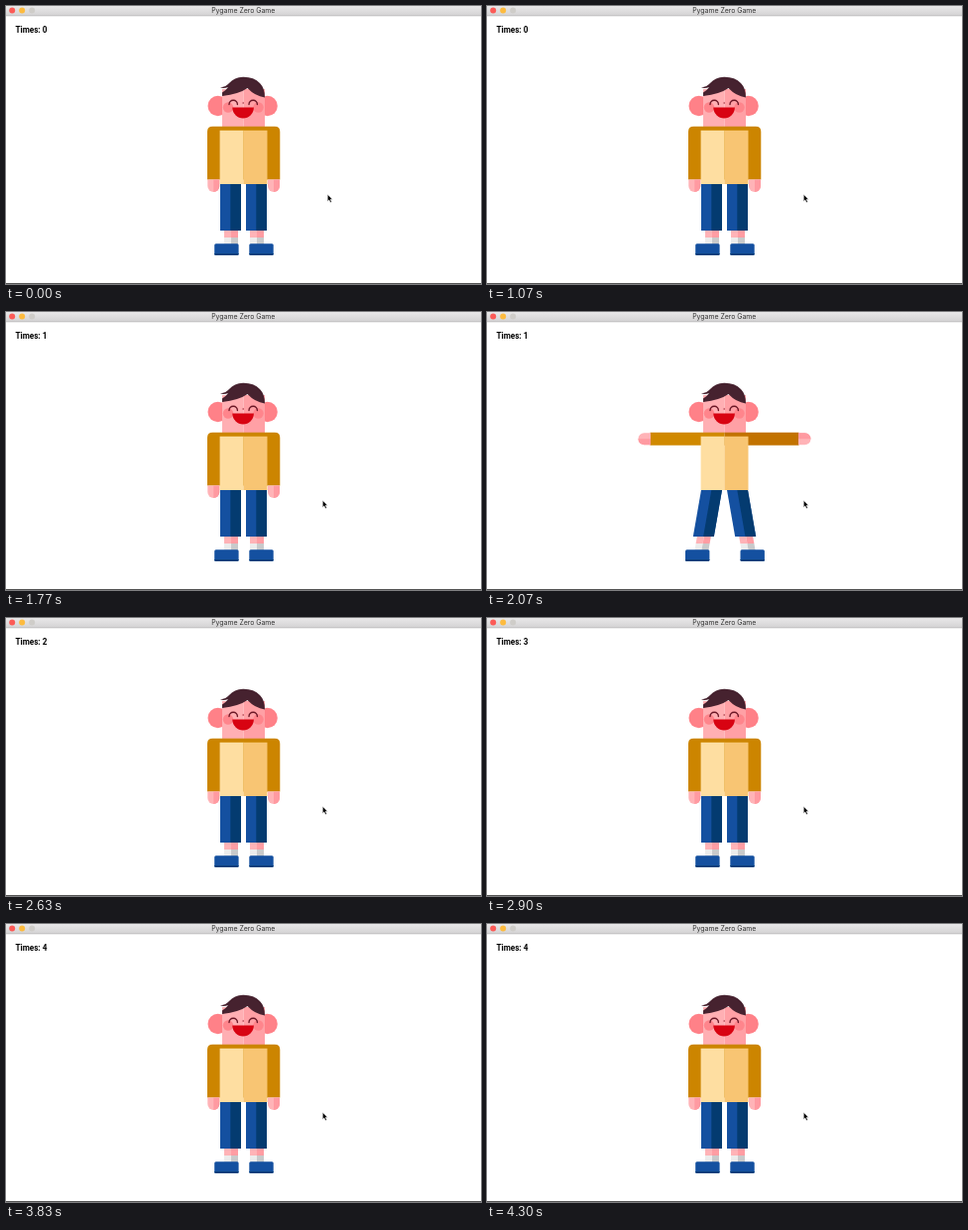
An HTML page that plays this animation: 479 px wide and 281 px high, repeating every 4360 ms.

```html
<!DOCTYPE html>
<html lang="en">
<head>
<meta charset="utf-8">
<title>Pygame Zero Game</title>
<style>
  html, body { margin: 0; width: 100%; height: 100%; overflow: hidden; background: #fff; }
  svg { display: block; width: 479px; height: 281px; }
  .title { font: 6.9px Inter, Roboto, sans-serif; fill: #333; text-anchor: middle; }
  .score { font: bold 8.2px Roboto, Arial, sans-serif; }
</style>
</head>
<body>
<svg viewBox="0 0 479 281">
  <defs>
    <linearGradient id="bar" x2="0" y2="1">
      <stop stop-color="#e9e8e9"/>
      <stop offset="1" stop-color="#d3d2d3"/>
    </linearGradient>
    <g id="trouser">
      <path fill="#1450a0" d="M0 180h21v47H0z"/>
      <path fill="#043b70" d="M10.3 180H21v47H10.3z"/>
      <path fill="#ffb3b7" d="M4 227h7v7H4z"/>
      <path fill="#ff9da3" d="M11 227h7v7h-7z"/>
      <path fill="#ececec" d="M4 234h7v7H4z"/>
      <path fill="#c9cacb" d="M11 234h7v7h-7z"/>
    </g>
    <g id="shoe">
      <rect y="240.3" width="24.4" height="11.7" rx="1.5" fill="#1450a0"/>
      <path fill="#073f7c" d="M0 250h24.4v.7q0 1.3-1.5 1.3H1.5Q0 252 0 250.7z"/>
    </g>
    <g id="hand">
      <path fill="#ffb3b7" d="M0 0h12v6.5a6 6 0 0 1-12 0z"/>
      <path fill="#ff9aa1" d="M6 0h6v6.5a6 6 0 0 1-6 6z"/>
    </g>
  </defs>

  <path fill="#fff" d="M0 0h479v281H0z"/>
  <path fill="url(#bar)" d="M0 0h479v10H0z"/>
  <path fill="#b9b8b9" d="M0 9.6h479v.6H0z"/>
  <path fill="#555" d="M0 280h479v1H0z"/>
  <circle cx="6.2" cy="4.6" r="3" fill="#fc5b57"/>
  <circle cx="16.2" cy="4.6" r="3" fill="#fdbb3f"/>
  <circle cx="26.2" cy="4.6" r="3" fill="#cfcdc9"/>
  <text class="title" x="239.3" y="7.2">Pygame Zero Game</text>
  <text class="score" id="score" x="9.4" y="26.6"></text>

  <g id="leftLeg"><use href="#trouser" x="216"/></g>
  <g id="rightLeg"><use href="#trouser" x="242"/></g>
  <use id="leftShoe" href="#shoe" x="210.2"/>
  <use id="rightShoe" href="#shoe" x="245.3"/>

  <g id="head">
    <circle cx="213.7" cy="101" r="10.2" fill="#ff8188"/>
    <circle cx="263.6" cy="101" r="10.2" fill="#ff8188"/>
    <path fill="#ffafb3" d="M218 84h21.5v39H218z"/>
    <path fill="#ffa0a5" d="M239.5 84H261v39h-21.5z"/>
    <circle cx="224" cy="102.5" r="5.2" fill="#ff858c"/>
    <circle cx="254.5" cy="102.5" r="5.2" fill="#ff858c"/>
    <path fill="#46222f" d="M216 82.5Q222 81.5 225 78Q230 72 239 71.7Q250 71.5 256 78Q261 83 261 92.5Q251 91 243.5 83Q235 89 218 91V87.5Q222 85 224 82Q220 83.5 216 82.5z"/>
    <g fill="none" stroke="#6b1726" stroke-width="1.4" stroke-linecap="round">
      <path d="M225 99.5a4.2 4.2 0 0 1 8.4 0M245 99.5a4.2 4.2 0 0 1 8.4 0"/>
    </g>
    <circle cx="239.2" cy="98" r=".8" fill="#a5313f"/>
    <path fill="#d80312" d="M228.3 102.5h21.6a10.8 11 0 0 1-21.6 0z"/>
  </g>

  <g id="armsDown">
    <path fill="#cc8500" d="M203 175.5V127q0-5.3 5.3-5.3H271q5.3 0 5.3 5.3v48.5z"/>
    <use href="#hand" x="203.3" y="175.5"/>
    <use href="#hand" x="264" y="175.5"/>
  </g>
  <g id="armsOut">
    <path fill="#d08900" d="M164.5 121.7h75v13h-75z"/>
    <path fill="#c27200" d="M239.5 121.7h75v13h-75z"/>
    <use href="#hand" transform="translate(165 122.2) rotate(90)"/>
    <use href="#hand" transform="translate(314 134.2) rotate(-90)"/>
  </g>
  <path fill="#fedea1" d="M215.6 125.7h24V180h-24z"/>
  <path fill="#f8c573" d="M239.5 125.7h24V180h-24z"/>

  <path id="cursor" fill="#000" stroke="#fff" stroke-width=".5"
        d="M0 0v7l1.6-1.5 1.2 2.7 1.3-.6-1.2-2.6h2.1z"/>
</svg>
<script>
  const LOOP = 4360;
  const SPREADS = [[2000, 2100], [2870, 2900], [3770, 3830]];
  const COUNT_TIMES = [1130, 2100, 2900, 3830];
  const SLANT = 0.174, SHOE_SHIFT = 10.2, HIP = 180;

  const el = id => document.getElementById(id);
  const show = (id, on) => el(id).setAttribute("display", on ? "inline" : "none");
  const place = (id, value) => el(id).setAttribute("transform", value);

  function poseSide(side, sign, spread) {
    const slant = sign * SLANT * spread;
    place(side + "Leg", `matrix(1 0 ${slant} 1 ${-slant * HIP} 0)`);
    place(side + "Shoe", `translate(${sign * SHOE_SHIFT * spread} 0)`);
  }

  function draw(t) {
    const spread = SPREADS.some(([from, to]) => t >= from && t < to);
    show("armsOut", spread);
    show("armsDown", !spread);
    poseSide("left", -1, +spread);
    poseSide("right", 1, +spread);
    el("score").textContent = "Times: " + COUNT_TIMES.filter(c => t >= c).length;
    const slide = Math.min(1, Math.max(0, t / 130));
    place("cursor", `translate(${324.3 - 5 * slide} 190.5)`);
  }

  const start = performance.now();
  function tick() {
    draw((performance.now() - start) % LOOP);
    requestAnimationFrame(tick);
  }
  tick();
</script>
</body>
</html>
```
